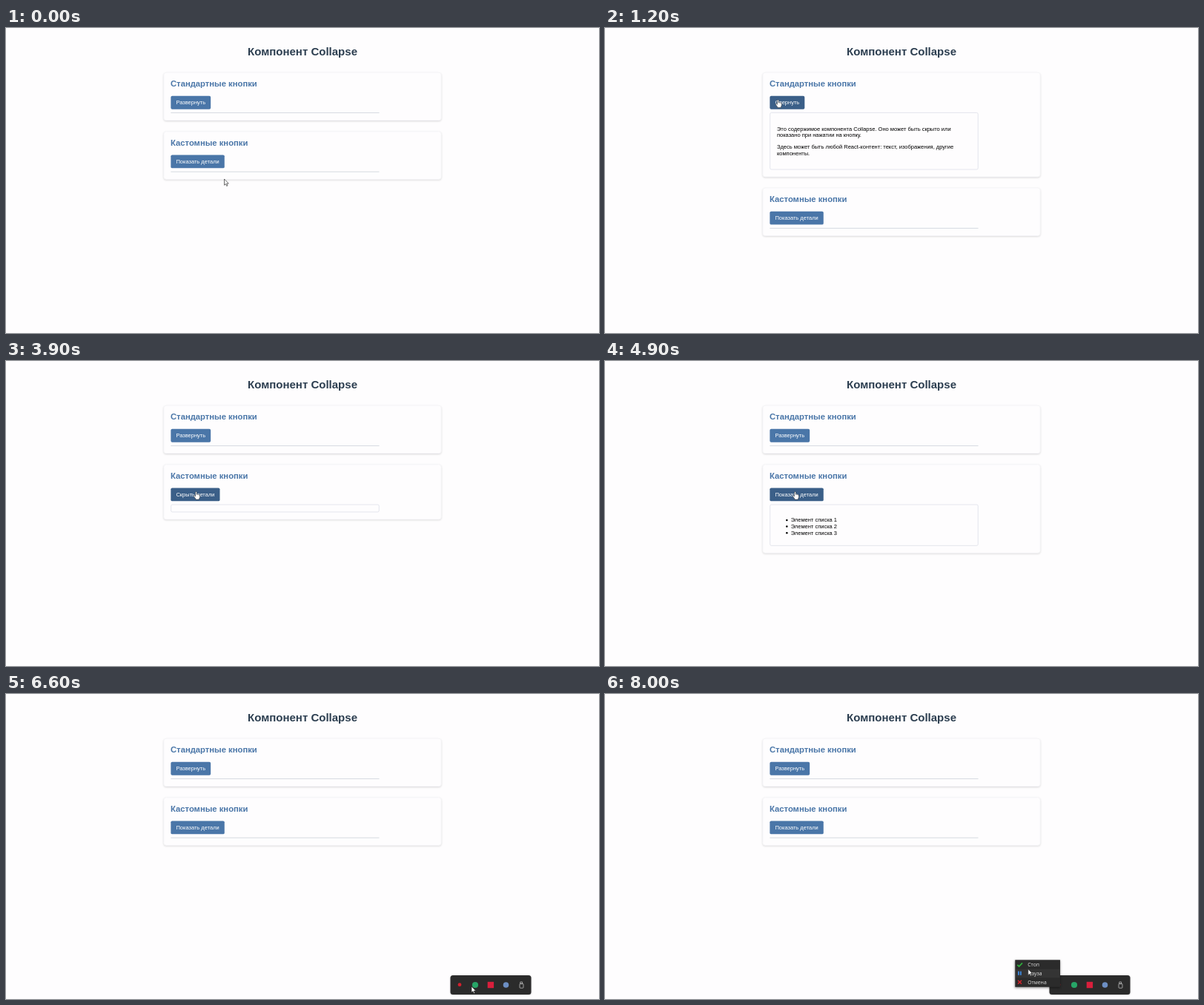
An HTML page with a canvas for the animation above (8.1 s loop, 800 by 412 pixels).

```html
<!DOCTYPE html>
<html lang="ru">
<head>
<meta charset="utf-8">
<title>Компонент Collapse</title>
<style>
  html, body { margin: 0; width: 100%; height: 100%; overflow: hidden; background: #fefdfe; }
  canvas { display: block; width: 800px; height: 412px; }
</style>
</head>
<body>
<canvas id="stage" width="800" height="412"></canvas>
<script>
const ctx = document.getElementById('stage').getContext('2d');
const LOOP = 8100, STEP = 100, TOGGLE = 200;
const ARIAL = '"Liberation Sans", Arial, sans-serif';
const MENU_FONT = '6.8px "Open Sans", "Noto Sans", sans-serif';
const BLUE = '#4a76a8', BLUE_HOVER = '#3b5f88';
const CONTENT_X = 222.35, CONTENT_W = 281.2;

const cards = [
  {
    top: 60, title: 'Стандартные кнопки', labels: ['Развернуть', 'Свернуть'],
    opens: 782, closes: 1995, hover: [600, 3000], full: 77.2,
    drawContent(y) {
      text('Это содержимое компонента Collapse. Оно может быть скрыто или', 231.9, y + 24.4, 7.5, '#000');
      text('показано при нажатии на кнопку.', 231.9, y + 33, 7.5, '#000');
      text('Здесь может быть любой React-контент: текст, изображения, другие', 231.9, y + 49.3, 7.5, '#000');
      text('компоненты.', 231.9, y + 57.9, 7.5, '#000');
    }
  },
  {
    top: 139.6, title: 'Кастомные кнопки', labels: ['Показать детали', 'Скрыть детали'],
    opens: 3885, closes: 4895, hover: [3600, 5200], full: 59.2,
    drawContent(y) {
      for (let i = 0; i < 3; i++) {
        const base = y + 23.6 + i * 8.7;
        disc(245.3, base - 2.4, 1.25, '#000');
        text('Элемент списка ' + (i + 1), 250.7, base, 7.5, '#000');
      }
    }
  }
];

// Pointer waypoints: time, x, y
const path = [
  [0, 294.5, 204], [100, 272, 170], [200, 220, 100], [300, 185, 45], [400, 175, 27],
  [500, 185, 48], [600, 224, 94], [700, 234, 98], [900, 234, 98], [1200, 233.3, 97],
  [2900, 233.3, 97], [3000, 220.5, 109], [3200, 222, 128], [3500, 236, 165],
  [3800, 256.5, 176.5], [5100, 256.5, 176.5], [5200, 296, 150], [5300, 350, 136],
  [5500, 500, 220], [5700, 570, 265], [5900, 570, 265], [6000, 602, 335],
  [6100, 628, 395], [6600, 628, 395], [7200, 614.3, 395.5], [7500, 614.3, 395.5],
  [7800, 609, 381], [7900, 609, 381], [8000, 570.8, 371.5]
];

const clamp = v => Math.max(0, Math.min(1, v));
const ease = v => 1 - Math.pow(1 - clamp(v), 2.3);

function pointerAt(t) {
  const next = path.findIndex(p => p[0] > t);
  if (next < 0) return path[path.length - 1].slice(1);
  const [t0, x0, y0] = path[next - 1], [t1, x1, y1] = path[next];
  const k = (t - t0) / (t1 - t0);
  return [x0 + (x1 - x0) * k, y0 + (y1 - y0) * k];
}

function text(str, x, y, size, color, weight = 400, align = 'left') {
  ctx.font = `${weight} ${size}px ${ARIAL}`;
  ctx.fillStyle = color;
  ctx.textAlign = align;
  ctx.fillText(str, x, y);
}

function box(x, y, w, h, r, fill, stroke, line = 0.5) {
  ctx.beginPath();
  ctx.roundRect(x, y, w, h, r);
  if (fill) { ctx.fillStyle = fill; ctx.fill(); }
  if (stroke) { ctx.strokeStyle = stroke; ctx.lineWidth = line; ctx.stroke(); }
}

function disc(x, y, r, color) {
  ctx.beginPath();
  ctx.arc(x, y, r, 0, Math.PI * 2);
  ctx.fillStyle = color;
  ctx.fill();
}

function withShadow(color, blur, dy, draw) {
  ctx.save();
  ctx.shadowColor = color;
  ctx.shadowBlur = blur;
  ctx.shadowOffsetY = dy;
  draw();
  ctx.restore();
}

function drawCard(card, shift, t) {
  const top = card.top + shift;
  const openness = ease((t - card.opens) / TOGGLE) - ease((t - card.closes) / TOGGLE);
  const extra = (card.full - 0.94) * openness;
  withShadow('rgba(0,0,0,.16)', 2.6, 0.9, () => box(212.6, top, 374.8, 65 + extra, 3.75, '#fff'));
  box(212.8, top + 0.2, 374.4, 64.6 + extra, 3.6, '#fefdfe', '#ececf0');
  text(card.title, 222, top + 19.3, 11.25, BLUE, 700);

  const label = card.labels[t >= card.opens && t < card.closes ? 1 : 0];
  const hovered = t >= card.hover[0] && t < card.hover[1];
  ctx.font = `7.5px ${ARIAL}`;
  box(CONTENT_X, top + 31.8, ctx.measureText(label).width + 14.06, 17.9, 1.9, hovered ? BLUE_HOVER : BLUE);
  text(label, CONTENT_X + 7.03, top + 43.1, 7.5, '#fff');

  const y = top + 54.1;
  if (extra < 1) {
    ctx.fillStyle = '#d3d9df';
    ctx.fillRect(CONTENT_X, y, CONTENT_W, 0.94 + extra);
  } else {
    ctx.save();
    ctx.beginPath();
    ctx.rect(CONTENT_X, y, CONTENT_W, 0.5 + extra);
    ctx.clip();
    card.drawContent(y);
    ctx.restore();
    box(CONTENT_X + 0.3, y + 0.3, CONTENT_W - 0.6, extra + 0.4, 1.9, null, '#d9dce6', 0.7);
  }
  return extra;
}

function drawTray(t) {
  if (t < 6400) return;
  const y = 380 + 6 * (1 - clamp((t - 6400) / 100));
  const mid = y + 13;
  withShadow('rgba(0,0,0,.25)', 2, 0.5, () => box(599.5, y, 109, 26, 3.5, '#2b2b2b'));
  if (t >= 6900 && t < 7400) box(602, y + 2.5, 20.5, 21, 2, '#363636');
  disc(612, mid - 0.3, 2.4, '#d3202e');
  disc(633, mid, 4.1, '#27a567');
  box(649.7, mid - 4.2, 8.4, 8.4, 0, '#d91f3c');
  disc(674.5, mid, 3.8, '#6d8fc4');
  box(693.8, mid - 4, 2.8, 2.4, 0, null, '#d0d0d0', 0.7);
  box(693, mid - 1.6, 5, 5.8, 0.8, null, '#d0d0d0', 0.7);
}

function line(points, color, width) {
  ctx.beginPath();
  points.forEach(([x, y]) => ctx.lineTo(x, y));
  ctx.strokeStyle = color;
  ctx.lineWidth = width;
  ctx.stroke();
}

function drawMenu(t) {
  if (t < 7400) return;
  withShadow('rgba(0,0,0,.45)', 3, 1, () => box(553.3, 359.2, 60.7, 36.6, 0, '#2b2b2b'));
  if (t >= 7700) box(554, 371.7, 59.3, 11.6, 0, '#343434');
  ctx.font = MENU_FONT;
  ctx.fillStyle = '#e2e2e2';
  ctx.textAlign = 'left';
  ['Стоп', 'Пауза', 'Отмена'].forEach((item, i) => ctx.fillText(item, 570.3, 368.2 + i * 11.7));
  line([[556.3, 365.8], [558.6, 368], [563, 363.4]], '#2fae3c', 1.8);
  box(557, 374.6, 1.9, 5.2, 0, '#3d86d8');
  box(559.9, 374.6, 1.9, 5.2, 0, '#3d86d8');
  line([[557, 386.8], [562, 391.6]], '#d3222b', 1.5);
  line([[562, 386.8], [557, 391.6]], '#d3222b', 1.5);
}

function drawArrow(x, y) {
  const shape = new Path2D('M0 0V8.3L1.9 6.6L3.2 9.5L4.5 8.9L3.2 6.1H5.8Z');
  ctx.save();
  ctx.translate(x, y);
  ctx.fillStyle = '#fff';
  ctx.fill(shape);
  ctx.strokeStyle = '#222';
  ctx.lineWidth = 0.65;
  ctx.stroke(shape);
  ctx.restore();
}

function drawHand(x, y) {
  const shape = new Path2D('M-.9 .5Q0-.7 .9 .5V3.8Q1.8 3.2 2.4 4.1Q3.3 3.5 3.8 4.4' +
    'Q5 4.1 5 5.3V7.6L4.1 9.4V10.6H-.7V9.4L-3 6.4Q-3.2 5.2-2.1 5.3L-.9 6.4Z');
  ctx.save();
  ctx.translate(x, y);
  ctx.fillStyle = '#fff';
  ctx.fill(shape);
  ctx.strokeStyle = '#222';
  ctx.lineWidth = 0.5;
  ctx.stroke(shape);
  ctx.restore();
}

function render(t) {
  ctx.fillStyle = '#fefdfe';
  ctx.fillRect(0, 0, 800, 412);
  text('Компонент Collapse', 400, 37.1, 15, '#2c3e50', 700, 'center');
  cards.reduce((shift, card) => shift + drawCard(card, shift, t), 0);
  drawTray(t);
  drawMenu(t);
  const onButton = cards.some(({ hover }) => t >= hover[0] && t < hover[1]);
  (onButton ? drawHand : drawArrow)(...pointerAt(t));
}

function tick() {
  const t = performance.now() % LOOP;
  render(Math.floor(t / STEP) * STEP);
  requestAnimationFrame(tick);
}
tick();
</script>
</body>
</html>
```
